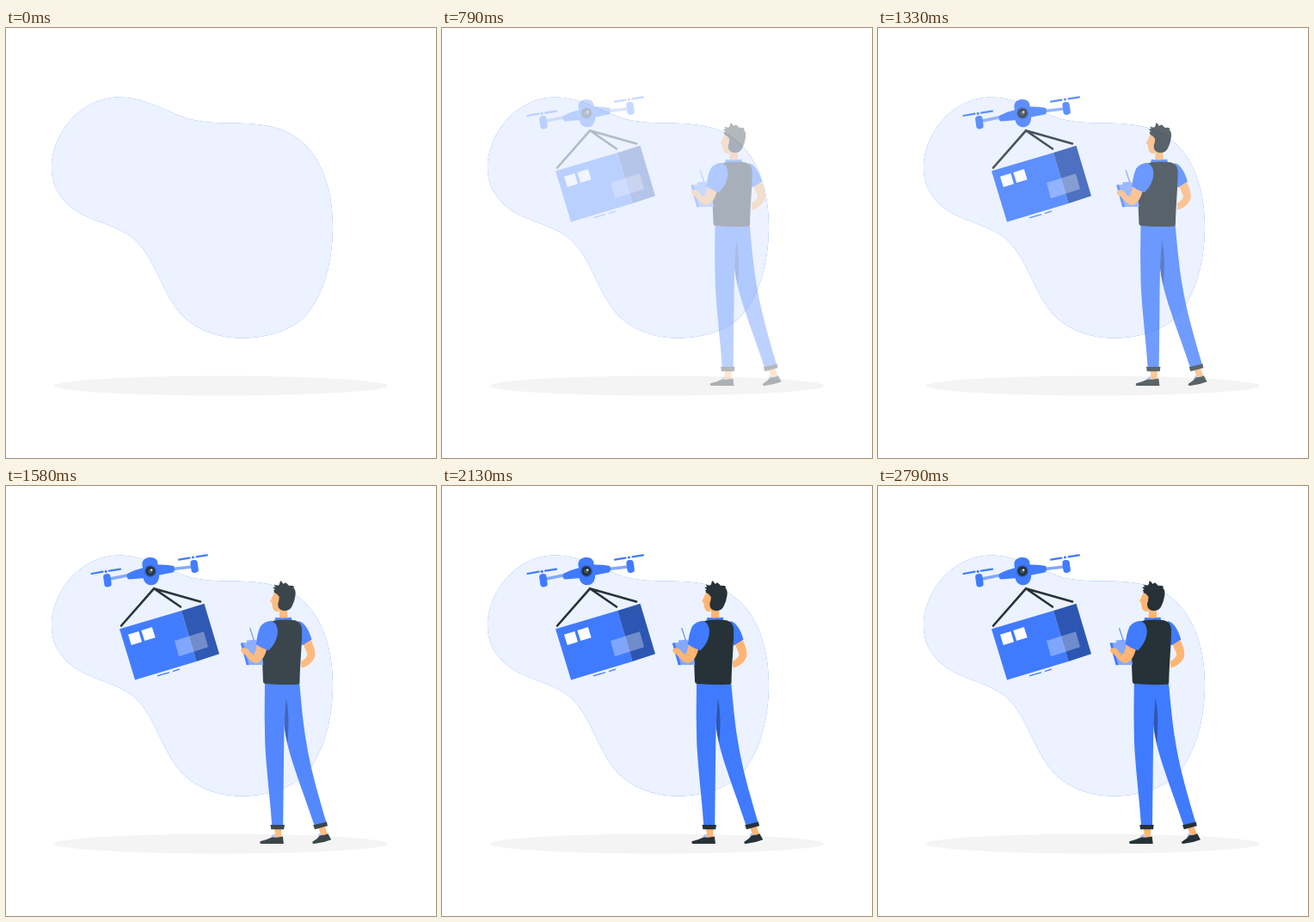
Write an HTML page that moves like this. It is 500 px wide and 500 px high and loops after 2830 ms.

```html
<!DOCTYPE html>
<html lang="en">
<head>
<meta charset="utf-8">
<title>Drone delivery</title>
<style>
  html, body { margin: 0; width: 100%; height: 100%; overflow: hidden; background: #fff; }
  svg { display: block; width: 100vw; height: 100vh; }
  .blue { fill: #407bff; }
  .navy { fill: #2d56b3; }
  .dark { fill: #263238; }
  .skin { fill: #ffb573; }
  .line { fill: none; stroke: #407bff; stroke-linecap: round; }
</style>
</head>
<body>
<svg viewBox="0 0 500 500">
  <defs>
    <path id="blob" d="M53 163C53 122 88 80.5 131 80.5C163 80.5 187 98 214 106C244 114 277 107 310 115C358 126 380 175 380 230C380 275 368 314 346 337C327 354 300 360.5 274 360.5C245 360.5 219 350 203 332C178 303 172 260 143 241C120 226 93 224 73 206C59 193 53 179 53 163Z"/>
  </defs>
  <use href="#blob" fill="#407bff"/>
  <use href="#blob" fill="#fff" opacity=".9"/>
  <ellipse cx="250" cy="416" rx="194" ry="11.4" fill="#f4f4f4"/>

  <g id="drone" opacity="0">
    <path class="line" stroke-width="3.6" style="stroke:#82a8ff" d="M121 108L143 103.5M194 96.5L216 94"/>
    <path class="line" stroke-width="2.2" d="M99.5 102L112.5 99.7M120 98.7L133 96.6M201 85.6L213.5 83.7M221.5 82.4L234 80.4"/>
    <circle class="blue" cx="116.2" cy="99.4" r="1.6"/>
    <circle class="blue" cx="217.4" cy="83" r="1.6"/>
    <rect class="blue" x="113.7" y="102" width="8.4" height="15.4" rx="3.8" transform="rotate(-8 118 109.7)"/>
    <rect class="blue" x="214.9" y="86" width="8.4" height="15" rx="3.8" transform="rotate(-8 219 93.5)"/>
    <path class="blue" d="M142 101.5Q151 97 160 95L162 107L143 108.5Q140 108 140.5 103Z"/>
    <path class="blue" d="M174 91.5Q185 91 194 92.8Q196 93 196 97Q196 100 194 100.6L176 104Z"/>
    <path class="blue" d="M167 83C173 82.5 177 86 176.5 91Q176 94 177.5 97Q179 101 178 106C177 112 174 115 169.5 115.3C164 115.4 160.5 112 159.6 107Q159 104 159.3 100Q159.6 97 158.6 93C157.6 87 161 83.4 167 83Z"/>
    <circle cx="168" cy="99" r="6.8" fill="#2d56b3"/>
    <circle class="dark" cx="168" cy="99" r="5.4"/>
    <circle cx="168" cy="99" r="2.6" fill="#455a64"/>
    <circle cx="169.2" cy="97.6" r="1.2" fill="#fff"/>

    <path class="blue" d="M132 166.3L204 145L221.5 204L150 225.5Z"/>
    <path class="navy" d="M204 145L230.5 136.7L248 195.3L221.5 204Z"/>
    <path fill="#fff" d="M142 172.8L154.3 169L158 181.2L145.8 185ZM157.3 168L169.8 164L173.6 176.2L161.2 180Z"/>
    <path fill="#fff" opacity=".32" d="M196 180L230 169.3L235 187.2L201 198.2Z"/>
    <path class="line" stroke-width="1.3" d="M176.5 220.7L189.5 216.8M194.5 215.4L201.5 213.2"/>
    <path class="line" stroke-width="2.6" style="stroke:#263238" d="M134 162.5L172 119.3L203 140.5M172 119.3L226 134.5"/>
  </g>

  <g id="man" opacity="0">
    <path class="skin" d="M309 399H317.3L316.6 409H310ZM360 397.5L367.5 395.8L371 406L364 408Z"/>
    <path fill="#a6c2f5" d="M304.5 408L308.5 404.5L310.5 408ZM359 408L361.5 403.5L364.5 406Z"/>
    <path class="dark" d="M292.2 413.2Q300 411.5 306.5 408.3Q312 409.5 318.7 407.6L319.7 416H293.2Q291.6 415.4 292.2 413.2Z"/>
    <path class="dark" d="M353.2 413.8Q359 410.5 362 406.3Q367 406.5 371.2 404.2L375 411.3Q366 415 355 416Q352.6 415.8 353.2 413.8Z"/>
    <path class="blue" d="M316 229H338C340 250 342 275 346 298C351 330 362 366 369.3 391L355.5 395C345 363 330 325 324 300Q320 280 320 260Z"/>
    <path class="navy" d="M322.5 246Q325 258 325.2 270Q325.5 286 324 299Q321 288 320 276Z"/>
    <path class="blue" d="M297.8 229H326L322.5 247Q320.3 270 320 300L319 395H306C303.5 360 299.5 330 298 299Q297 265 297.8 229Z"/>
    <path class="dark" d="M304.3 394H320.8L320 399.2H305.2ZM354 394.3L369.8 390.5L370.8 395.3L355.8 399.3Z"/>

    <path class="skin" d="M342 183L351 178.5C355 186 357 193 356 198C354 205 347 210 340.5 211.5L340 204C345 201 348 197.5 347 194.5Z"/>
    <path class="blue" d="M337 157C345 159 349.5 169 352.3 178.5L341 185.5L336 175Z"/>
    <path class="skin" d="M308.6 124.5Q306 130 304 134Q304.2 135.4 306 135.5Q306.2 140 307.6 143.5Q309 147 315 145.5L314.4 155H324.6L323.5 142L325 126L314 119Z"/>
    <path class="dark" d="M307 118.4Q309 117 310.2 117.2L308.4 114.6Q311.6 115.8 314 115.4Q315.4 113 315.8 110Q318.2 111.6 319.3 114Q321 112 322.3 112.6Q324.5 114.5 326 116Q330 115.3 332.2 117.2Q331 117.8 331.2 118.6Q334.2 121.5 333.3 127Q332.4 134 329.5 139.5Q327 144.8 322 145Q316 145.6 313.6 141Q312.5 138 313.5 134.5L314 129Q313.6 126.5 310.6 124.8Q308.2 124.6 308.5 122.2Q307 121 310 120Q308.6 119 307 118.4Z"/>
    <path class="skin" d="M314.6 128.6Q312.4 127.4 311.2 129.6Q310.2 133 312 135.4Q313.4 135.6 314 133.8Z"/>
    <path class="blue" d="M310.3 152.8Q319 154.2 328.3 152.6L329.8 157.5H309Z"/>

    <path class="dark" d="M303 157.8Q317 154 333 156.2Q340.8 158.5 341 167C341 185 338.5 210 338.3 228Q338.2 230.6 335.5 230.7Q317 231.4 299 230Q296 229.8 295.8 227.5L294 184L298 166Z"/>
    <path fill="#82a8ff" d="M272.5 182.4L277 182L276.5 179.5L287 178.8L288.5 181.2L292.5 181L296 208H279.2Z"/>
    <path class="line" stroke-width="1.1" style="stroke:#5b8dff" d="M280.6 165.5L285 179"/>
    <path class="blue" d="M269.6 183Q270.5 182 272.6 182.3L279.6 208.2H276.5Z"/>
    <path class="skin" d="M288.5 184L299.8 190C298 198 293.5 205.5 287.5 206C282 205.4 278 199.5 274 195.6Q269.6 193.5 270 190.5Q271.4 187.6 274.5 188.3Q278.5 188.6 280 192.6Q283 196.4 285 195.4Q287.5 192 288.5 184Z"/>
    <path class="blue" d="M305 156.8C310.5 158.5 313 164 312.6 170.5C312 179 307.5 186.5 302 191.2Q294 189 287.6 184C288.5 176 290 169 292.5 163.5Q297 157.5 305 156.8Z"/>
  </g>
</svg>
<script>
  const LOOP = 2830, HOLD = 250, LEAD = 85;
  const drone = document.getElementById("drone");
  const man = document.getElementById("man");
  const clamp = v => Math.min(1, Math.max(0, v));

  const bez = (a, b, s) => 3 * (1 - s) * (1 - s) * s * a + 3 * (1 - s) * s * s * b + s * s * s;

  // cubic-bezier(.36, -.01, .5, 1.38), solved by bisection
  function overshoot(x) {
    let lo = 0, hi = 1;
    for (let i = 0; i < 24; i++) {
      const mid = (lo + hi) / 2;
      if (bez(.36, .5, mid) < x) lo = mid; else hi = mid;
    }
    return bez(-.01, 1.38, hi);
  }

  function smooth(t, from, to) {
    const u = clamp((t - from) / (to - from));
    return u * u * (3 - 2 * u);
  }

  function draw(t) {
    const shown = t >= HOLD;
    const p = overshoot(clamp((t + LEAD) / LOOP));
    man.setAttribute("opacity", shown ? clamp(p) : 0);
    man.setAttribute("transform", `translate(${30 * (1 - p)} 0)`);
    drone.setAttribute("opacity", shown ? smooth(t, 300, 1700) : 0);
  }

  const start = performance.now();
  function tick() {
    draw((performance.now() - start) % LOOP);
    requestAnimationFrame(tick);
  }
  tick();
</script>
</body>
</html>
```
